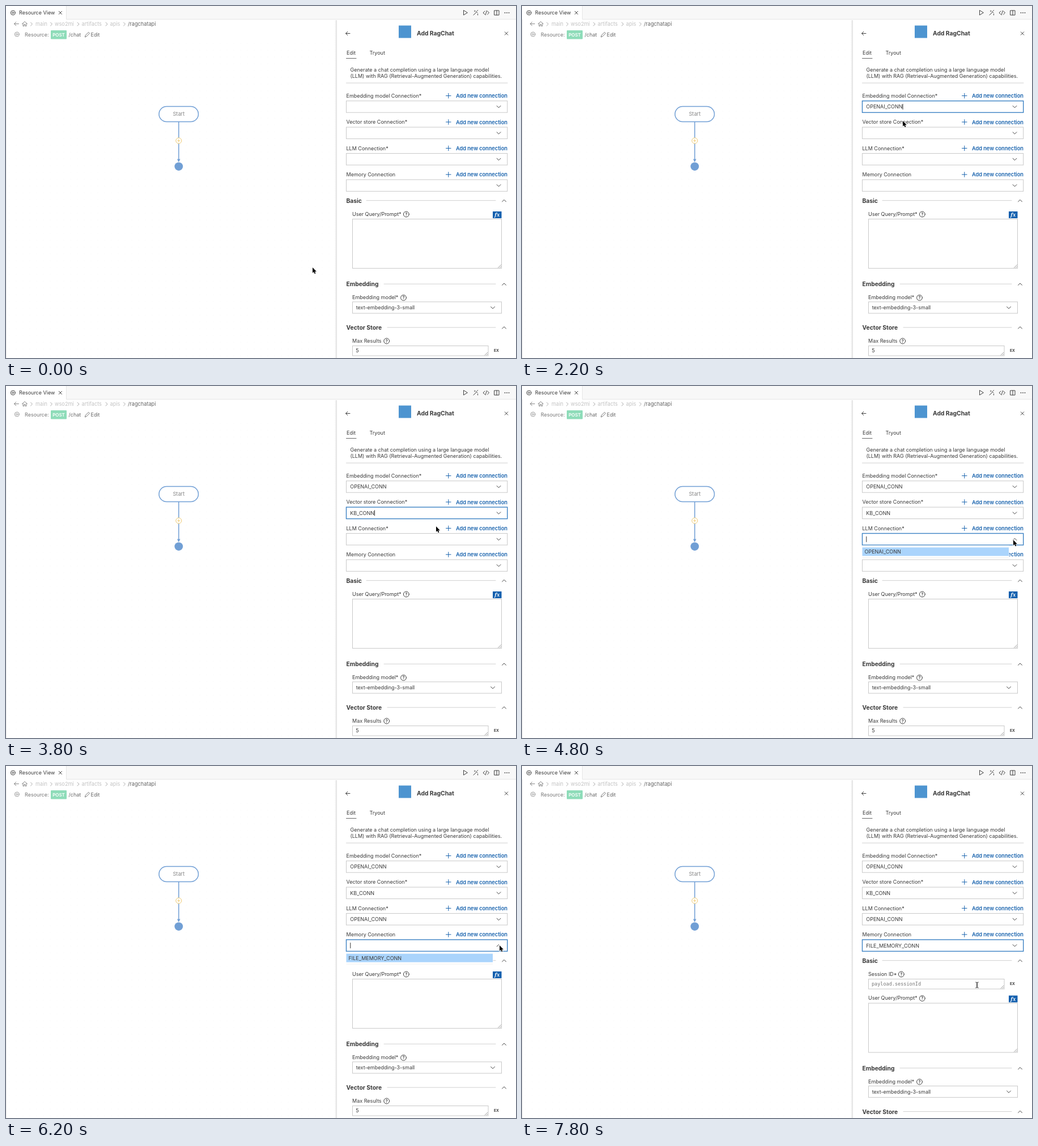
An HTML page for the animation above (8000 ms loop, 900 px wide and 622 px high).

```html
<!DOCTYPE html>
<html lang="en">
<head>
<meta charset="utf-8">
<title>Add RagChat</title>
<style>
html, body { margin: 0; width: 100%; height: 100%; overflow: hidden; background: #fff; }
svg { display: block; width: 900px; height: 622px; font: 9px Inter, "Open Sans", sans-serif; }
text { fill: #3a3a3a; white-space: pre; }
.line { fill: none; stroke: #3f3f3f; stroke-width: 1; stroke-linecap: round; stroke-linejoin: round; }
.box { fill: #fff; stroke: #c9c9c9; }
.box.focus { stroke: #3c82c4; stroke-width: 1.4; }
.head { font-size: 10.3px; font-weight: 700; }
.link { font-size: 9.2px; font-weight: 600; fill: #1762ad; }
.pale { font-size: 9.2px; fill: #c3c3c3; }
.mono { font: 8.5px "DejaVu Sans Mono", monospace; fill: #777; }
.ex { font-size: 6.6px; font-weight: 700; }
</style>
</head>
<body>
<svg id="stage" viewBox="0 0 900 622" xmlns="http://www.w3.org/2000/svg"></svg>
<script>
const LOOP = 8000, STEP = 200, SESSION_SHIFT = 42.6;

// open / chosen: times at which each list appears and its option is taken
const fields = [
  { label: 'Embedding model Connection*', value: 'OPENAI_CONN', open: 1200, chosen: 2000 },
  { label: 'Vector store Connection*', value: 'KB_CONN', open: 3200, chosen: 3600 },
  { label: 'LLM Connection*', value: 'OPENAI_CONN', open: 4600, chosen: 5400 },
  { label: 'Memory Connection', value: 'FILE_MEMORY_CONN', open: 6200, chosen: 7000 }
];
const fieldY = i => 178 + i * 46.4;
const clicks = [1000, 1800, 3000, 3400, 4400, 5200, 6800];

// time, x, y
const pointerPath = [
  [0, 541, 462], [900, 870, 181], [1200, 870, 180], [1700, 650, 199], [2000, 650, 199],
  [2200, 672, 203], [2400, 690, 209], [2900, 869, 226], [3200, 869, 226], [3400, 690, 243],
  [3600, 690, 243], [3800, 759, 248], [4200, 867, 271], [4800, 867, 272], [5200, 660, 291],
  [5400, 660, 291], [6000, 870, 317], [6200, 871, 317], [6700, 660, 339], [7200, 660, 339],
  [7700, 803, 387], [8000, 803, 387]
];

const text = (x, y, s, attrs = '') => `<text x="${x}" y="${y}" ${attrs}>${s}</text>`;
const line = (d, attrs = '') => `<path class="line" d="${d}" ${attrs}/>`;
const box = (x, y, w, h, attrs = '') => `<rect class="box" x="${x}" y="${y}" width="${w}" height="${h}" ${attrs}/>`;
const chevron = (x, y, up) => line(up ? `M${x - 3.4} ${y + 1.8}l3.4 -3.4l3.4 3.4` : `M${x - 3.4} ${y - 1.6}l3.4 3.4l3.4 -3.4`);
const help = (x, y) => `<circle class="line" cx="${x}" cy="${y}" r="4.9"/>` +
  text(x, y + 2.7, '?', 'text-anchor="middle" style="font-size:7.5px;font-weight:600"');
const grip = (x, y) => line(`M${x - 6} ${y - 1}l5 -5M${x - 3} ${y - 1}l2 -2`, 'style="stroke:#888;stroke-width:.8"');
const rule = (x1, x2, y) => line(`M${x1} ${y}H${x2}`, 'style="stroke:#d0d0d0"');
const section = (s, x, y) => text(600.5, y + 3.8, s, 'class="head"') + rule(x, 864, y - .3) + chevron(879, y, true);
const area = (x, y, w, h) => box(x, y, w, h) + grip(x + w, y + h);

function toolbar() {
  return `<rect width="900" height="23.5" fill="#f8f8f8"/><rect width="106" height="24" fill="#fff"/>` +
    line('M106.5 23.5H900M106.5 0V23', 'style="stroke:#e7e7e7"') + line('M.5 24V622', 'style="stroke:#ececec"') +
    `<circle class="line" cx="12.3" cy="12" r="3.9"/><circle class="line" cx="12.3" cy="12" r="1.4"/>` +
    text(23, 15.2, 'Resource View') + line('M93.3 9.3l5.2 5.2m0 -5.2l-5.2 5.2') +
    line('M807.5 8v8l6.5 -4z') +
    line('M825 16l5.5 -5.5M829 9l3 3M827 8v2M832.5 7.5l-1 1.2M832.5 14v2') +
    line('M845 9l-3 3l3 3M849.5 9l3 3l-3 3M848.3 8.3l-2.2 7.5') +
    line('M862 8h8v8h-8zM866 8v8') +
    [880.5, 884, 887.5].map(x => `<circle cx="${x}" cy="12" r=".9" fill="#444"/>`).join('');
}

function diagram() {
  const crumbs = [[52, 'main'], [86, 'wso2mi'], [133.5, 'artifacts'], [183.5, 'apis']];
  return `<pattern id="dots" width="12" height="12" patternUnits="userSpaceOnUse"><circle cx="6" cy="6" r=".5" fill="#eee"/></pattern>
    <rect x="1" y="62" width="582" height="560" fill="url(#dots)"/>` +
    line('M22.5 31.5h-8m3.3 -3.3l-3.3 3.3l3.3 3.3', 'style="stroke:#888"') +
    line('M28.5 31.5l4.5 -4l4.5 4M30 30.5v5h2v-3h2v3h2v-5', 'style="stroke:#888"') +
    [45, 80, 127.5, 177.5, 209].map(x => line(`M${x - 1.5} 29l3 3l-3 3`, 'style="stroke:#aaa"')).join('') +
    crumbs.map(([x, s]) => text(x, 35, s, 'class="pale"')).join('') +
    text(215, 35, '/ragchatapi', 'style="font-size:9.2px;fill:#666"') +
    `<circle class="line" cx="19.3" cy="50" r="3.9" style="stroke:#999"/><circle class="line" cx="19.3" cy="50" r="1.5" style="stroke:#999"/>` +
    text(33, 54, 'Resource:', 'style="fill:#777"') +
    `<rect x="79" y="43" width="28" height="15.5" rx="1" fill="#8edcb9"/>` +
    text(93, 53.8, 'POST', 'text-anchor="middle" style="fill:#fff;font-size:8px;font-weight:600"') +
    text(110.5, 54, '/chat', 'style="fill:#666"') +
    line('M139.5 54.5l.7 -2.7l5.5 -5.5l1.9 1.9l-5.5 5.5z', 'style="stroke:#777"') +
    text(149.5, 54, 'Edit', 'style="fill:#666"') +
    `<g stroke="#719fd5" stroke-width="1.5"><rect x="270" y="177.5" width="69.5" height="27" rx="13.5" fill="#fff"/>
    <path d="M304.8 205V272"/></g><path d="M302 270.5h5.6l-2.8 5.5z" fill="#719fd5"/><circle cx="304.8" cy="283.6" r="7.4" fill="#719fd5"/>` +
    text(304.8, 194.3, 'Start', 'text-anchor="middle" style="fill:#888;font-size:9.2px"') +
    `<circle cx="304.8" cy="238" r="5" fill="#fff" stroke="#f0cb74"/><path d="M302.3 238h5m-2.5 -2.5v5" stroke="#f0cb74"/>`;
}

function panel() {
  return `<linearGradient id="edge"><stop offset="0" stop-color="#fff"/><stop offset="1" stop-color="#dedede"/></linearGradient>
    <rect x="580" y="25" width="4" height="597" fill="url(#edge)"/><rect x="584" y="24" width="316" height="598" fill="#fff"/>` +
    line('M607 48.5h-7.5m3.2 -3.2l-3.2 3.2l3.2 3.2') + line('M880.3 45.8l5.4 5.4m0 -5.4l-5.4 5.4') +
    `<rect x="693" y="34.5" width="22" height="22" fill="#4d94d0"/>` +
    text(725, 52.4, 'Add RagChat', 'class="head"') +
    text(601, 86, 'Edit') + text(641.5, 86, 'Tryout') + line('M600.5 92.5H618', 'style="stroke:#666"') +
    text(607.5, 116.3, 'Generate a chat completion using a large language model') +
    text(607.5, 126.6, '(LLM) with RAG (Retrieval-Augmented Generation) capabilities.') +
    rule(600.5, 885, 136) +
    fields.map((f, i) => {
      const y = fieldY(i);
      return text(600.5, y - 16, f.label) + text(885, y - 15.8, 'Add new connection', 'class="link" text-anchor="end"') +
        line(`M776.5 ${y - 19.4}h8.6m-4.3 -4.3v8.6`, 'style="stroke:#1762ad"') +
        box(600.5, y - 10.3, 284.2, 20.5, `id="box${i}"`) + text(607.3, y + 3.3, '', `id="value${i}"`) +
        `<g id="chevron${i}"></g>`;
    }).join('') + section('Basic', 636, 344);
}

function form() {
  return `<g id="session">` + text(611, 370.8, 'Session ID*') + help(669.3, 368) + area(611.5, 376.5, 239.5, 17.5) +
    text(617, 388.3, 'payload.sessionId', 'class="mono"') + text(861, 387.3, 'EX', 'class="ex"') + `</g><g id="lower">` +
    text(611, 370.8, 'User Query/Prompt*') + help(706.3, 368) +
    `<rect x="859" y="363" width="15.5" height="12" fill="#125fae"/>` +
    text(866.8, 372, 'fx', 'text-anchor="middle" style="fill:#fff;font:italic bold 9px \'Noto Serif\',serif"') +
    area(611.5, 376.5, 263, 87) + section('Embedding', 667, 491.5) +
    text(611, 518.3, 'Embedding model*') + help(701.5, 515.5) +
    box(611.5, 522.8, 263, 20.2) + text(617.7, 536.2, 'text-embedding-3-small') + chevron(859, 533) +
    section('Vector Store', 673, 568.3) + text(611, 595, 'Max Results') + help(671.7, 592) +
    area(611.5, 600.5, 239.5, 17.5) + text(617.3, 612.3, '5') + text(861, 611.3, 'EX', 'class="ex"') + `</g>`;
}

const overlay = `<g id="list"><rect x="600.5" y="11" width="259" height="21.5" fill="#fff"/>
  <path d="M600.5 32.7H859" stroke="#eee"/><rect x="600.5" y="14.5" width="258.5" height="15" fill="#aad4fc"/>` +
  text(604.5, 25.4, '', 'id="option"') + `</g><path id="caret" d="M0 -5V5" stroke="#333"/>
  <g id="pointer"><circle id="ring" cx="0" cy="0" r="15" fill="none" stroke="#111" stroke-width="1.3"/>
  <path id="arrow" d="M0 0V9.8L2.2 7.8L3.7 11.2L5.4 10.4L3.9 7.2H6.9Z" stroke="#fff" stroke-width="1.4" paint-order="stroke"/>
  <path id="beam" class="line" d="M-2.2 -5q2.2 0 2.2 1.5v7q0 1.5 -2.2 1.5M2.2 -5q-2.2 0 -2.2 1.5v7q0 1.5 2.2 1.5" style="stroke:#222"/></g>`;

document.getElementById('stage').innerHTML = toolbar() + diagram() + panel() + form() + overlay;

const el = id => document.getElementById(id);
const show = (id, on) => el(id).setAttribute('visibility', on ? 'visible' : 'hidden');
const move = (id, x, y) => el(id).setAttribute('transform', `translate(${x} ${y})`);

function pointerAt(t) {
  const i = pointerPath.findIndex(p => p[0] > t);
  const [t0, x0, y0] = pointerPath[i - 1], [t1, x1, y1] = pointerPath[i];
  const u = (t - t0) / (t1 - t0), ease = u * u * (3 - 2 * u);
  return [x0 + (x1 - x0) * ease, y0 + (y1 - y0) * ease];
}

function render(t) {
  let active = -1;
  fields.forEach((f, i) => { if (t >= f.open) active = i; });

  fields.forEach((f, i) => {
    el('box' + i).classList.toggle('focus', i === active);
    el('value' + i).textContent = t >= f.chosen ? f.value : '';
    el('chevron' + i).innerHTML = chevron(869.5, fieldY(i), t >= f.open && t < f.chosen);
  });

  const f = fields[active], opened = !!f && t < f.chosen;
  show('list', opened);
  if (opened) {
    el('option').textContent = f.value;
    move('list', 0, fieldY(active));
  }
  if (f) {
    const since = t - (opened ? f.open : f.chosen);
    show('caret', Math.floor(since / 500) % 2 === 0);
    move('caret', 607.8 + el('value' + active).getComputedTextLength(), fieldY(active));
  } else show('caret', false);

  const session = t >= fields[3].chosen;
  show('session', session);
  move('lower', 0, session ? SESSION_SHIFT : 0);

  const typing = t >= 7600;
  move('pointer', ...pointerAt(t));
  show('ring', clicks.includes(t));
  show('arrow', !typing);
  show('beam', typing);
}

const start = performance.now();
let last = -1;
function tick() {
  const t = Math.floor((performance.now() - start) % LOOP / STEP) * STEP;
  if (t !== last) render(last = t);
  requestAnimationFrame(tick);
}
tick();
</script>
</body>
</html>
```
